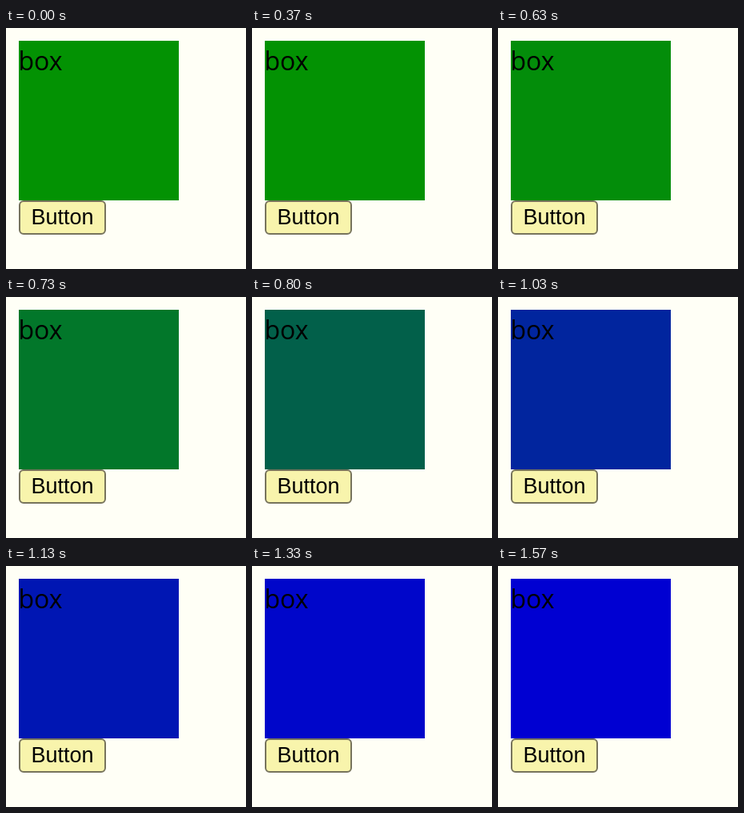
These frames come from a looping animation (300 by 302 pixels, 1610 ms). An HTML page:

```html
<!DOCTYPE html>
<html lang="en">
<head>
<meta charset="utf-8">
<title>Box colour transition</title>
<style>
html, body { margin: 0; width: 100%; height: 100%; overflow: hidden; background: #fffff6; }
svg { display: block; width: 300px; height: 302px; }
.label { font: 32px "Open Sans", "Noto Sans", sans-serif; }
.caption { font: 27px "Liberation Sans", Arial, sans-serif; }
</style>
</head>
<body>
<svg viewBox="0 0 300 302">
  <rect id="box" x="16" y="16" width="200" height="200"/>
  <text class="label" x="15.5" y="52.5">box</text>
  <rect x="17" y="217" width="107" height="41" rx="5" fill="#f8f4ac" stroke="#77745c" stroke-width="2"/>
  <text class="caption" x="31.5" y="246">Button</text>
</svg>
<script>
const LOOP = 1610, START = 580, DURATION = 1000;
const GREEN = [3, 146, 3], BLUE = [0, 0, 210];
const box = document.getElementById('box');

const bezier = (a, b, s) => 3 * a * s * (1 - s) ** 2 + 3 * b * s * s * (1 - s) + s ** 3;

// CSS "ease": cubic-bezier(.25, .1, .25, 1)
function ease(x) {
  if (x <= 0) return 0;
  if (x >= 1) return 1;
  let lo = 0, hi = 1;
  for (let i = 0; i < 24; i++) {
    const mid = (lo + hi) / 2;
    if (bezier(.25, .25, mid) < x) lo = mid; else hi = mid;
  }
  return bezier(.1, 1, lo);
}

function draw() {
  const p = ease((performance.now() % LOOP - START) / DURATION);
  const rgb = GREEN.map((c, i) => Math.round(c + (BLUE[i] - c) * p));
  box.setAttribute('fill', `rgb(${rgb})`);
  requestAnimationFrame(draw);
}
draw();
</script>
</body>
</html>
```
